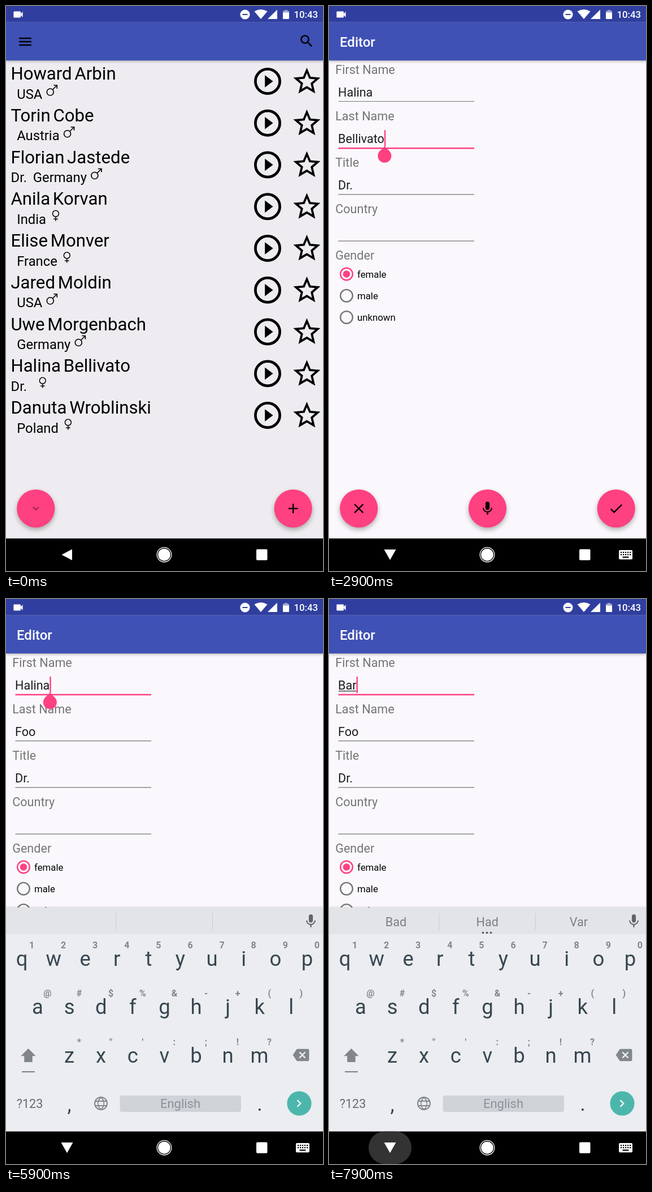
Recreate the animation shown at these times as an HTML page with a canvas. Size 561x998 px, loop 8 s.

```html
<!DOCTYPE html>
<html lang="en">
<head>
<meta charset="utf-8">
<title>Contact editor</title>
<style>
  html, body { margin: 0; width: 100%; height: 100%; overflow: hidden; background: #000; }
  canvas { display: block; width: 100%; height: 100%; }
</style>
</head>
<body>
<canvas id="stage" width="561" height="998"></canvas>
<script>
const W = 561, H = 998, LOOP = 8000, STEP = 100, NAV_TOP = 940.4;
const PINK = '#ff4081', TEAL = '#4db6ac', GREY = '#757575', KEY = '#37474f', PRESSED = '#cfd3d7';
const FADED = 'rgba(0,0,0,.42)';
const canvas = document.getElementById('stage');
const screen = canvas.getContext('2d');
const layer = Object.assign(document.createElement('canvas'), { width: W, height: H }).getContext('2d');
let g = screen;

const ICONS = {
  menu: 'M3 18h18v-2H3v2zm0-5h18v-2H3v2zm0-7v2h18V6H3z',
  search: 'M15.5 14h-.79l-.28-.27A6.5 6.5 0 1 0 13.73 14.43l.27.28v.79l5 5L20.5 19l-5-5zm-6 0a4.5 4.5 0 1 1 0-9 4.5 4.5 0 0 1 0 9z',
  star: 'M22 9.24l-7.19-.62L12 2 9.19 8.63 2 9.24l5.46 4.73L5.82 21 12 17.27 18.18 21l-1.63-7.03zM12 15.4l-3.76 2.27 1-4.28-3.32-2.88 4.38-.38L12 6.1l1.71 4.04 4.38.38-3.32 2.88 1 4.28z',
  more: 'M16.59 8.59L12 13.17 7.41 8.59 6 10l6 6 6-6z',
  next: 'M8.59 16.59L13.17 12 8.59 7.41 10 6l6 6-6 6z',
  add: 'M19 13h-6v6h-2v-6H5v-2h6V5h2v6h6z',
  play: 'M8 5v14l11-7z',
  playSmall: 'M10 16.5l6-4.5-6-4.5z',
  trash: 'M6 19c0 1.1.9 2 2 2h8c1.1 0 2-.9 2-2V7H6zM19 4h-3.5l-1-1h-5l-1 1H5v2h14z',
  edit: 'M3 17.25V21h3.75L17.81 9.94l-3.75-3.75zM20.71 7.04c.39-.39.39-1.02 0-1.41l-2.34-2.34c-.39-.39-1.02-.39-1.41 0l-1.83 1.83 3.75 3.75z',
  close: 'M19 6.41L17.59 5 12 10.59 6.41 5 5 6.41 10.59 12 5 17.59 6.41 19 12 13.41 17.59 19 19 17.59 13.41 12z',
  mic: 'M12 14a3 3 0 0 0 3-3V5a3 3 0 0 0-6 0v6a3 3 0 0 0 3 3zm5.3-3c0 3-2.54 5.1-5.3 5.1S6.7 14 6.7 11H5c0 3.41 2.72 6.23 6 6.72V21h2v-3.28c3.28-.48 6-3.3 6-6.72z',
  check: 'M9 16.17L4.83 12l-1.42 1.41L9 19 21 7l-1.41-1.41z',
  camera: 'M17 10.5V7a1 1 0 0 0-1-1H4a1 1 0 0 0-1 1v10a1 1 0 0 0 1 1h12a1 1 0 0 0 1-1v-3.5l4 4v-11z',
  erase: 'M22 3H7c-.69 0-1.23.35-1.59.88L0 12l5.41 8.11c.36.53.9.89 1.59.89h15a2 2 0 0 0 2-2V5a2 2 0 0 0-2-2zm-3 12.59L17.59 17 14 13.41 10.41 17 9 15.59 12.59 12 9 8.41 10.41 7 14 10.59 17.59 7 19 8.41 15.41 12z',
  shift: 'M12 2L1 13h5v9h12v-9h5z'
};
for (const name in ICONS) ICONS[name] = new Path2D(ICONS[name]);

const CONTACTS = [
  ['Howard Arbin', 'USA', 'm'], ['Torin Cobe', 'Austria', 'm'], ['Florian Jastede', 'Germany', 'm', 'Dr.'],
  ['Anila Korvan', 'India', 'f'], ['Elise Monver', 'France', 'f'], ['Jared Moldin', 'USA', 'm'],
  ['Uwe Morgenbach', 'Germany', 'm'], ['Halina Bellivato', '', 'f', 'Dr.'], ['Danuta Wroblinski', 'Poland', 'f']
];
const LABELS = ['First Name', 'Last Name', 'Title', 'Country', 'Gender'];
const KEY_ROWS = [
  { keys: 'qwertyuiop', hints: '1234567890', x: 28, y: 635 },
  { keys: 'asdfghjkl', hints: '@#$%&-+()', x: 56, y: 720.5 },
  { keys: 'zxcvbnm', hints: '*"\':;!?', x: 112, y: 806 }
];
const KEY_PITCH = 56.1;
const SUGGESTIONS = {
  F: ['Of', 'F', 'For'], Fo: ['Of', 'For', 'Go'], Foo: ['Food', 'Foo', 'Foot'],
  B: ['Be', 'B', 'But'], Ba: ['Be', 'Ba', 'Bad'], Bar: ['Bad', 'Had', 'Var']
};
const TAPS = [[4700, 'F'], [5000, 'o'], [5200, 'o'], [7300, 'B'], [7500, 'a'], [7700, 'r']];
const CURSOR_RESETS = [2100, 2800, 3200, 3500, 3900, 4700, 5000, 5200, 5600, 6100, 6400, 6700, 7300, 7500, 7700];

const within = (t, from, to) => t >= from && t < to;
const progress = (t, start, length) => Math.min(1, Math.max(0, (t - start) / length));
const easeOut = p => 1 - (1 - p) ** 3;

function rect(x, y, w, h, color, radius = 0) {
  g.fillStyle = color;
  g.beginPath();
  g.roundRect(x, y, w, h, radius);
  g.fill();
}
function disc(x, y, r, color) {
  g.fillStyle = color;
  g.beginPath();
  g.arc(x, y, r, 0, 7);
  g.fill();
}
function ring(x, y, r, width, color = '#000') {
  g.lineWidth = width;
  g.strokeStyle = color;
  g.beginPath();
  g.arc(x, y, r, 0, 7);
  g.stroke();
}
function polygon(color, ...points) {
  g.fillStyle = color;
  g.beginPath();
  points.forEach(([x, y]) => g.lineTo(x, y));
  g.fill();
}
function stroke(path, width, color) {
  g.lineWidth = width;
  g.strokeStyle = color;
  g.stroke(new Path2D(path));
}
function text(s, x, y, size, color = '#000', align = 'left', weight = 400) {
  g.font = `${weight} ${size}px Roboto, sans-serif`;
  g.fillStyle = color;
  g.textAlign = align;
  g.fillText(s, x, y);
  return g.measureText(s).width;
}
function icon(name, x, y, scale = 1.2, color = '#000') {
  g.save();
  g.translate(x - 12 * scale, y - 12 * scale);
  g.scale(scale, scale);
  g.fillStyle = color;
  g.fill(ICONS[name]);
  g.restore();
}
function withShadow(blur, offset, alpha, draw) {
  g.save();
  g.shadowColor = `rgba(0,0,0,${alpha})`;
  g.shadowBlur = blur;
  g.shadowOffsetY = offset;
  draw();
  g.restore();
}

function fab(x, name, color = '#000', scale = 1.2, pressed = false) {
  withShadow(8, 4, .3, () => disc(x, 887.6, 33.6, PINK));
  if (pressed) disc(x, 887.6, 33.6, 'rgba(255,255,255,.25)');
  icon(name, x, 887.6, scale, color);
}
function gender(kind, x, y) {
  g.save();
  g.translate(x, y);
  if (kind === 'm') {
    ring(-3, 3, 6, 1.7);
    stroke('M1.5 -1.5L9 -9M3 -9H9V-3', 1.7, '#000');
  } else {
    ring(0, -3.5, 5.5, 1.5);
    stroke('M0 2V9.5M-3.8 6H3.8', 1.5, '#000');
  }
  g.restore();
}
function frame(background, title) {
  rect(0, 0, W, H, background);
  withShadow(5, 2, .3, () => rect(0, 28.8, W, 67.4, '#3f51b5'));
  rect(0, 0, W, 28.8, '#303f9f');
  if (title) text(title, 19, 72, 24, '#fff', 'left', 500);
}

function listScreen(t) {
  frame('#eeecf0');
  icon('menu', 34, 63);
  icon('search', 532, 62);
  CONTACTS.forEach(([name, country, sex, title = ''], i) => {
    const y = i * 73.75;
    if (i === 7 && t >= 100) rect(0, y + 98, W, 73.75, 'rgba(0,0,0,.08)');
    g.wordSpacing = '-3px';
    text(name, 8.4, y + 130, 31.2);
    g.wordSpacing = '0px';
    text(title, 8.6, y + 163.5, 23.8);
    const x = title ? 47.8 : 19.2;
    const end = x + text(country, x, y + 163.5, 23.8);
    gender(sex, end + 17, y + 149);
    ring(463, y + 133, 21.6, 4.8);
    icon('playSmall', 463, y + 133, 2.4);
    icon('star', 532.4, y + 133, 2.4);
  });
  fab(52.8, 'more', FADED, .95);
  fab(508.2, 'add');
}

function detailScreen(t) {
  frame('#faf9fc', 'Halina Bellivato');
  LABELS.forEach((label, i) => {
    const y = i * 76.8;
    text(label, 11.2, y + 119.5, 21.6, GREY);
    text(['Halina', 'Bellivato', 'Dr.'][i] || '', 11, y + 164, 36, GREY);
  });
  gender('f', 22.8, 442.5);
  fab(52.8, 'trash', FADED);
  fab(280.5, 'play');
  fab(508.2, 'edit', FADED, 1.2, t >= 1900);
}

// Holding backspace removes one letter at once, then one every 50 ms.
function erased(word, t, press, repeat) {
  if (t < press) return word;
  const count = 1 + Math.max(0, Math.floor((t - repeat) / 50));
  return word.slice(0, Math.max(0, word.length - count));
}
const typed = (t, from, to) =>
  TAPS.filter(([time]) => time <= t && within(time, from, to)).map(([, key]) => key).join('');

function editorState(t) {
  const first = erased('Halina', t, 6100, 6400) + typed(t, 7000, LOOP);
  const last = erased('Bellivato', t, 3200, 3500) + typed(t, 4500, 5600);
  const focus = within(t, 2800, 5600) ? 1 : 0;
  return {
    values: [first, last, 'Dr.', ''],
    focus,
    word: focus ? last : first,
    composing: within(t, 3200, 5600) || t >= 6100,
    handle: within(t, 2800, 3200) || within(t, 5600, 6100),
    cursor: (t - CURSOR_RESETS.findLast(time => time <= t)) % 1000 < 500
  };
}

function editorScreen(t) {
  const state = editorState(t);
  frame('#faf8fc', 'Editor');
  LABELS.forEach((label, i) => text(label, 11.2, 119.5 + i * 82.2, 21.6, GREY));
  state.values.forEach((value, i) => {
    const y = i * 82.2, focused = i === state.focus;
    const width = text(value, 16, y + 160, 21.6, '#1c1c1e');
    const end = value ? 16 + width : 16.6;
    rect(16.5, y + (focused ? 167.8 : 167.9), 240.5, focused ? 2.4 : 1.2, focused ? PINK : GREY);
    if (!focused) return;
    if (state.composing && value) rect(17, y + 162, width - 1, 1.2, '#222');
    if (state.cursor) rect(end, y + 137, 2.4, 29, PINK);
    if (state.handle) {
      disc(end + .5, y + 182.5, 12, PINK);
      polygon(PINK, [end + .5, y + 165.5], [end + 9, y + 174], [end - 8, y + 174]);
    }
  });
  ['female', 'male', 'unknown'].forEach((label, i) => {
    const y = 473.5 + i * 38.2;
    ring(31, y, 10.8, 2.4, i ? GREY : PINK);
    if (!i) disc(31, y, 6.2, PINK);
    text(label, 50, y + 6.5, 16.8);
  });
  fab(52.8, 'close');
  fab(280.5, 'mic');
  fab(508.2, 'check');
  if (t >= 2950) keyboard(t, state);
}

function keyboard(t, { word, composing }) {
  const caps = composing && !word;
  const shiftColor = caps ? TEAL : '#80868b';
  g.save();
  g.translate(0, (1 - easeOut(progress(t, 2950, 250))) * 395);
  withShadow(4, 0, .2, () => rect(0, 545, W, 396, '#ebedf1'));
  rect(0, 545, W, 47, '#e2e4e8');
  rect(194, 555, 1, 29, '#c8cbcf');
  rect(365, 555, 1, 29, '#c8cbcf');
  if (composing && word) {
    const words = SUGGESTIONS[word] ||
      (word[0] === 'H' ? ['Hall', 'Half', 'Halo'] : ['Bells', 'Bell a', 'Bellflowers']);
    words.forEach((s, i) => text(s, 118.5 + i * 161.7, 578, 21.6, '#7b8085', 'center'));
    for (const x of [272.5, 279.5, 286.5]) disc(x, 589.5, 1.8, '#4a5055');
  }
  icon('mic', 539.5, 569, 1.2, '#5f666b');

  if (within(t, 6700, 6900)) rect(5, 773, 69, 65, PRESSED);
  if (within(t, 3200, 4100) || within(t, 6100, 6700)) rect(487.5, 773, 68.5, 65, PRESSED);
  for (const { keys, hints, x, y } of KEY_ROWS) {
    [...keys].forEach((key, i) => {
      const cx = x + i * KEY_PITCH;
      text(caps ? key.toUpperCase() : key, cx, y + 12.5, 36.5, KEY, 'center');
      text(hints[i], cx + 17.5, y - 18.5, 16, '#80868b', 'center', 700);
    });
  }
  icon('shift', 39.5, 806, 1.2, shiftColor);
  rect(28, 834, 23, 2.2, '#80868b');
  icon('erase', 522, 805.5, 1.2, '#80868b');

  text('?123', 42, 899, 21.6, '#626b71', 'center');
  text(',', 112, 905, 36, KEY, 'center');
  text('.', 449, 904, 36, KEY, 'center');
  ring(168, 891, 11, 2, '#80868b');
  stroke('M157.5 887H178.5M157.5 895H178.5M168 880C161 887 161 895 168 902C175 895 175 887 168 880', 1.8, '#80868b');
  rect(201.5, 877, 214.5, 29, PRESSED, 4);
  text('English', 308.5, 899, 22, '#8a9196', 'center');
  disc(519, 891, 21.6, TEAL);
  icon('next', 518.5, 891, 1.1, '#fff');

  const tap = TAPS.find(([time]) => within(t, time, time + 100));
  if (tap) keyPopup(tap[1]);
  g.restore();
}

function keyPopup(key) {
  const row = KEY_ROWS.find(({ keys }) => keys.includes(key.toLowerCase()));
  const x = row.x + row.keys.indexOf(key.toLowerCase()) * KEY_PITCH;
  rect(x - 23, row.y + 15, 46, 16, PRESSED);
  withShadow(5, 2, .45, () => rect(x - 29, row.y - 118, 58, 138, '#cfd4d8', 2));
  text(key, x, row.y - 63.5, 52, KEY, 'center');
  for (const dx of [13.5, 19, 24.5]) disc(x + dx, row.y - 53, 1.4, '#80868b');
}

function statusIcons() {
  icon('camera', 21.5, 15, .9, '#fff');
  disc(423, 15, 8.6, '#fff');
  rect(418.5, 14, 9, 2, '#303f9f');
  g.fillStyle = '#fff';
  g.fill(new Path2D('M451 23L439.5 9.5Q451 2.5 462.5 9.5Z'));
  polygon('#fff', [463, 23], [480, 23], [480, 6.5]);
  rect(493, 7, 5, 3, '#9fa6d3');
  rect(490, 8.5, 11, 4, '#9fa6d3', 1);
  rect(490, 11.5, 11, 11.5, '#fff', 1);
  text('10:43', 509.5, 21, 16.8, '#fff', 'left', 500);
}

function navigationBar(t) {
  rect(0, NAV_TOP, W, H - NAV_TOP, '#000');
  if (t >= 7900) rect(70, NAV_TOP, 76, H - NAV_TOP, '#333', 29);
  if (t >= 2800) {
    polygon('#fff', [97.5, 960], [118.5, 960], [108, 978.5]);
    rect(513, 961, 24, 16.5, '#fff', 2);
    for (let i = 0; i < 10; i++) rect(516 + i % 5 * 4, 964 + Math.floor(i / 5) * 4, 2.2, 2.2, '#000');
    rect(519.5, 972.5, 11, 2.2, '#000');
  } else {
    polygon('#fff', [98.5, 969.2], [117, 959.5], [117, 979]);
  }
  disc(280, 969.2, 10.8, '#fff');
  ring(280, 969.2, 12.8, 1.3, '#fff');
  rect(443, 959.5, 19.5, 19.5, '#fff', 2);
}

// A new screen fades in while it rises into place.
function open(draw, t, start) {
  g = layer;
  draw(t);
  g = screen;
  g.globalAlpha = progress(t, start, 200);
  g.drawImage(layer.canvas, 0, (1 - easeOut(progress(t, start, 350))) * H * .08);
  g.globalAlpha = 1;
}

function render(now) {
  const t = Math.floor(now % LOOP / STEP) * STEP;
  if (t < 700) listScreen(t);
  else if (t < 2500) detailScreen(t);
  else editorScreen(t);
  if (within(t, 350, 700)) open(detailScreen, t, 350);
  if (within(t, 2100, 2500)) open(editorScreen, t, 2100);
  statusIcons();
  navigationBar(t);
}

const start = performance.now();
function tick() {
  render(performance.now() - start);
  requestAnimationFrame(tick);
}
tick();
</script>
</body>
</html>
```
